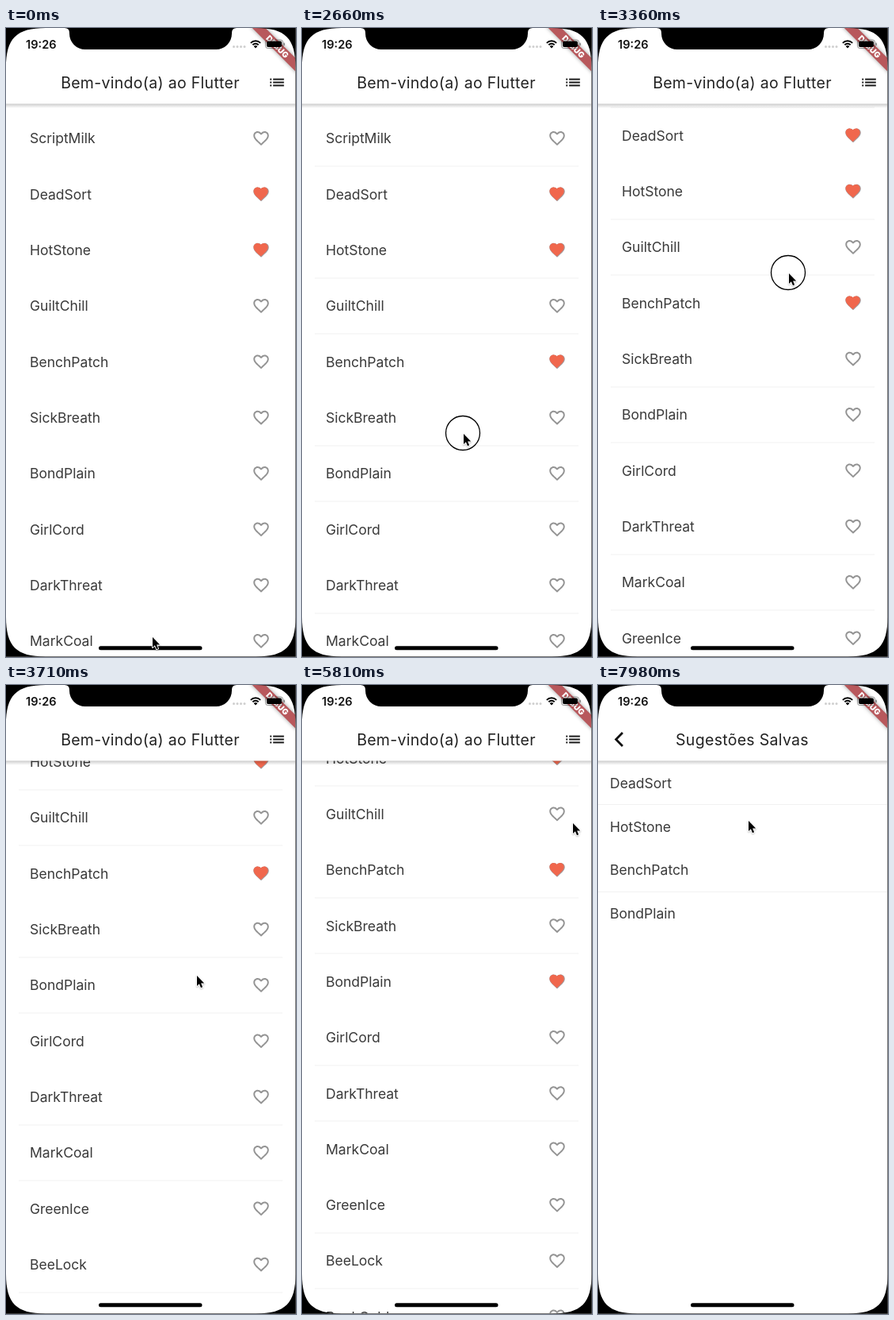
Write an HTML page with a canvas that moves like this. It is 366 px wide and 792 px high and loops after 8000 ms.

```html
<!DOCTYPE html>
<html lang="pt">
<head>
<meta charset="utf-8">
<title>Lista</title>
<style>
html, body { margin: 0; width: 100%; height: 100%; overflow: hidden; background: #000; }
canvas { display: block; width: 366px; height: 792px; }
</style>
</head>
<body>
<canvas id="stage"></canvas>
<script>
const W = 366, H = 792, LOOP = 8000, STEP = 70;
const FONT = 'Inter, "Open Sans", sans-serif';
const BAR = 96, ROW = 70.333, SAVED_ROW = 54.66;

const names = ['ScriptMilk', 'DeadSort', 'HotStone', 'GuiltChill', 'BenchPatch', 'SickBreath',
  'BondPlain', 'GirlCord', 'DarkThreat', 'MarkCoal', 'GreenIce', 'BeeLock', 'BookCold'];
const likedAt = { DeadSort: 0, HotStone: 0, BenchPatch: 1330, BondPlain: 5250 };
const presses = [[2310, 3430], [5040, 5250]];
const dividersFrom = 1330;
const slide = { start: 6840, length: 440 };

// time, x, y of the pointer tip
const pointer = [
  [0, 185, 767], [840, 331, 417], [980, 326, 418], [1640, 326, 418], [1890, 302, 413],
  [2110, 302, 413], [2310, 204, 511], [2660, 204, 511], [3360, 241, 309], [3430, 241, 308],
  [3710, 241, 366], [4270, 329, 373], [4690, 326, 377], [5480, 326, 377], [5810, 342, 174],
  [6300, 341, 78], [6510, 340, 66], [7500, 340, 66], [7840, 189, 179], [7980, 190, 171], [8000, 190, 171]
];
const scroll = [[0, 0], [2660, 0], [3000, 8], [3200, 32], [3360, 74], [3500, 140],
  [3710, 183], [4100, 187.5], [8000, 187.5]];

const heart = new Path2D('M12 21.35l-1.45-1.32C5.4 15.36 2 12.28 2 8.5 2 5.42 4.42 3 7.5 3c1.74 0 3.41.81 4.5 2.09C13.09 3.81 14.76 3 16.5 3 19.58 3 22 5.42 22 8.5c0 3.78-3.4 6.86-8.55 11.54z');
const heartInner = new Path2D('M12 18.65C7.14 14.24 4 11.39 4 8.5 4 6.5 5.5 5 7.5 5c1.54 0 3.04.99 3.57 2.36h1.87C13.46 5.99 14.96 5 16.5 5c2 0 3.5 1.5 3.5 3.5 0 2.89-3.14 5.74-8 10.15z');
const heartOutline = new Path2D(heart);
heartOutline.addPath(heartInner);
const arrow = new Path2D('M0 0V13L2.9 10.3 5 15.2 7.1 14.3 5.1 9.5H9.2Z');

const canvas = document.getElementById('stage');
const dpr = window.devicePixelRatio || 1;
canvas.width = W * dpr;
canvas.height = H * dpr;
const c = canvas.getContext('2d');

// Monotone cubic interpolation through keys [time, value...]
function track(keys, t, k = 1) {
  let i = 0;
  while (i < keys.length - 2 && t >= keys[i + 1][0]) i++;
  const grade = n => n < 0 || n > keys.length - 2 ? 0 :
    (keys[n + 1][k] - keys[n][k]) / (keys[n + 1][0] - keys[n][0]);
  const tangent = n => {
    const a = grade(n - 1), b = grade(n);
    return a * b > 0 ? 2 * a * b / (a + b) : 0;
  };
  const [a, b] = [keys[i], keys[i + 1]], d = b[0] - a[0], u = (t - a[0]) / d, v = 1 - u;
  return a[k] * (1 + 2 * u) * v * v + tangent(i) * d * u * v * v +
    b[k] * (3 - 2 * u) * u * u - tangent(i + 1) * d * u * u * v;
}

function bezierEase(u, x1, y1, x2, y2) {
  if (u <= 0 || u >= 1) return u <= 0 ? 0 : 1;
  const at = (s, p, q) => 3 * (1 - s) * (1 - s) * s * p + 3 * (1 - s) * s * s * q + s * s * s;
  let lo = 0, hi = 1;
  for (let i = 0; i < 24; i++) {
    const mid = (lo + hi) / 2;
    if (at(mid, x1, x2) < u) lo = mid; else hi = mid;
  }
  return at(lo, y1, y2);
}

function rect(x, y, w, h, color) {
  c.fillStyle = color;
  c.fillRect(x, y, w, h);
}

function round(x, y, w, h, r, color) {
  c.fillStyle = color;
  c.beginPath();
  c.roundRect(x, y, w, h, r);
  c.fill();
}

function label(text, x, y, size, { weight = 400, color = '#3a3a3a', align = 'left', spacing = 0 } = {}) {
  c.font = `${weight} ${size}px ${FONT}`;
  c.letterSpacing = spacing + 'px';
  c.textAlign = align;
  c.textBaseline = 'alphabetic';
  c.fillStyle = color;
  c.fillText(text, x, y + size * 0.36);
}

const rowText = (text, x, y) => label(text, x, y, 17.6, { spacing: -0.05 });

function drawHeart(x, y, liked) {
  c.save();
  c.translate(x, y);
  c.scale(0.976, 0.976);
  c.translate(-12, -12.1);
  if (liked) {
    c.fillStyle = '#a39a9c';
    c.fill(heart);
    c.translate(11.6, 11.5);
    c.scale(0.93, 0.93);
    c.translate(-12, -12);
    c.fillStyle = '#f0674d';
    c.fill(heart);
  } else {
    c.fillStyle = '#949494';
    c.fill(heartOutline, 'evenodd');
  }
  c.restore();
}

function appBar(title) {
  const shade = c.createLinearGradient(0, BAR - 1, 0, BAR + 5);
  shade.addColorStop(0, 'rgba(0,0,0,.24)');
  shade.addColorStop(0.4, 'rgba(0,0,0,.12)');
  shade.addColorStop(1, 'rgba(0,0,0,0)');
  rect(0, BAR - 1, W, 6, shade);
  rect(0, 0, W, BAR - 0.5, '#fff');
  label(title, 182, 68.5, 19.5, { color: '#222', align: 'center', spacing: 0.3 });
}

function drawList(t) {
  const offset = track(scroll, t);
  rect(0, 0, W, H, '#fff');
  names.forEach((name, i) => {
    const y = 139 + i * ROW - offset;
    rowText(name, 30, y);
    drawHeart(322, y, t >= likedAt[name]);
    const line = y + 35, part = line - Math.floor(line);
    // hairlines drop out at some subpixel positions
    if (t >= dividersFrom && (part < 0.25 || part > 0.58)) rect(16, Math.round(line) - 0.5, 333, 1, '#f1f1f1');
  });
  appBar('Bem-vindo(a) ao Flutter');
  for (const y of [64.6, 68.5, 72.4]) {
    rect(333.2, y - 1, 2, 2, '#1c1c1c');
    rect(337.1, y - 1, 13.7, 2, '#1c1c1c');
  }
}

function drawSaved() {
  rect(0, 0, W, H, '#fff');
  Object.keys(likedAt).forEach((name, i) => {
    rowText(name, 15, 123.7 + i * SAVED_ROW);
    if (i % 2 === 0) rect(0, Math.round(150.4 + i * SAVED_ROW), W, 1, '#f1f1f1');
  });
  appBar('Sugestões Salvas');
  c.strokeStyle = '#111';
  c.lineWidth = 2.8;
  c.lineJoin = 'miter';
  c.beginPath();
  c.moveTo(31, 60);
  c.lineTo(22.7, 68.5);
  c.lineTo(31, 77);
  c.stroke();
}

function drawPages(t) {
  const p = bezierEase((t - slide.start) / slide.length, 0.35, 0.91, 0.33, 0.97);
  if (p < 1) {
    c.save();
    c.translate(-W / 3 * p, 0);
    drawList(t);
    c.restore();
  }
  if (p > 0) {
    const x = W * (1 - p);
    if (p < 1) {
      const shade = c.createLinearGradient(x - 18, 0, x, 0);
      shade.addColorStop(0, 'rgba(0,0,0,0)');
      shade.addColorStop(1, 'rgba(0,0,0,.2)');
      rect(x - 18, 0, 18, H, shade);
    }
    c.save();
    c.translate(x, 0);
    drawSaved();
    c.restore();
  }
}

function drawBanner() {
  c.save();
  c.translate(W, 0);
  c.rotate(Math.PI / 4);
  c.shadowColor = 'rgba(0,0,0,.4)';
  c.shadowBlur = 5 * dpr;
  rect(-42, 27.3, 84, 11.7, '#b8585c');
  c.shadowBlur = 0;
  c.shadowColor = 'transparent';
  label('DEBUG', 0, 33.2, 10.2, { weight: 900, color: '#fff', align: 'center' });
  c.restore();
}

function drawStatus() {
  label('19:26', 25, 20.3, 14.6, { weight: 600, color: '#111' });
  for (let i = 0; i < 4; i++) round(286 + i * 4.5, 22, 3, 3, 1.5, '#cfcfcf');
  c.strokeStyle = '#000';
  c.lineWidth = 2;
  for (const r of [5.2, 8.7]) {
    c.beginPath();
    c.arc(315, 25, r, -Math.PI * 0.75, -Math.PI * 0.25);
    c.stroke();
  }
  c.fillStyle = '#000';
  c.beginPath();
  c.moveTo(315, 25.5);
  c.arc(315, 25.5, 3.4, -Math.PI * 0.75, -Math.PI * 0.25);
  c.fill();
  c.strokeStyle = 'rgba(0,0,0,.4)';
  c.lineWidth = 1;
  c.beginPath();
  c.roundRect(327.5, 15, 22, 10.6, 3);
  c.stroke();
  round(329, 16.5, 19, 7.6, 1.8, '#000');
  round(350.6, 18.5, 1.4, 3.8, 0.7, 'rgba(0,0,0,.45)');
}

// Smooth display corner, mirrored by the signs sx and sy
function corner(x, y, sx, sy) {
  const reach = 50, pull = 13;
  c.beginPath();
  c.moveTo(x, y);
  c.lineTo(x, y + sy * reach);
  c.bezierCurveTo(x, y + sy * pull, x + sx * pull, y, x + sx * reach, y);
  c.fill();
}

function drawFrame() {
  rect(365, 0, 1, H, '#777');
  rect(0, 791, W, 1, '#777');
  c.fillStyle = '#000';
  corner(0, 0, 1, 1);
  corner(W - 0.5, 0, -1, 1);
  corner(0, H - 0.5, 1, -1);
  corner(W - 0.5, H - 0.5, -1, -1);
  c.beginPath();
  c.moveTo(74, 0);
  c.quadraticCurveTo(80, 0, 80, 6);
  c.arcTo(80, 27, 101, 27, 20);
  c.arcTo(285, 27, 285, 6, 20);
  c.lineTo(285, 6);
  c.quadraticCurveTo(285, 0, 291, 0);
  c.fill();
  round(117, 778.3, 130.5, 5, 2.5, '#000');
}

function drawPointer(t) {
  const x = track(pointer, t, 1), y = track(pointer, t, 2);
  if (presses.some(([from, to]) => t >= from && t < to)) {
    c.beginPath();
    c.arc(x - 1, y - 1, 21.5, 0, 7);
    c.fillStyle = 'rgba(255,255,255,.5)';
    c.fill();
    c.strokeStyle = '#000';
    c.lineWidth = 1.3;
    c.stroke();
  }
  c.save();
  c.translate(x, y);
  c.shadowColor = 'rgba(0,0,0,.25)';
  c.shadowBlur = 2 * dpr;
  c.shadowOffsetY = dpr;
  c.strokeStyle = '#fff';
  c.lineWidth = 1.8;
  c.lineJoin = 'round';
  c.stroke(arrow);
  c.shadowColor = 'transparent';
  c.fillStyle = '#000';
  c.fill(arrow);
  c.restore();
}

function draw(now) {
  const t = Math.floor((now % LOOP) / STEP) * STEP;
  c.setTransform(dpr, 0, 0, dpr, 0, 0);
  drawPages(t);
  drawBanner();
  drawStatus();
  drawFrame();
  drawPointer(t);
}

const begin = performance.now();
function tick() {
  draw(performance.now() - begin);
  requestAnimationFrame(tick);
}
tick();
</script>
</body>
</html>
```
